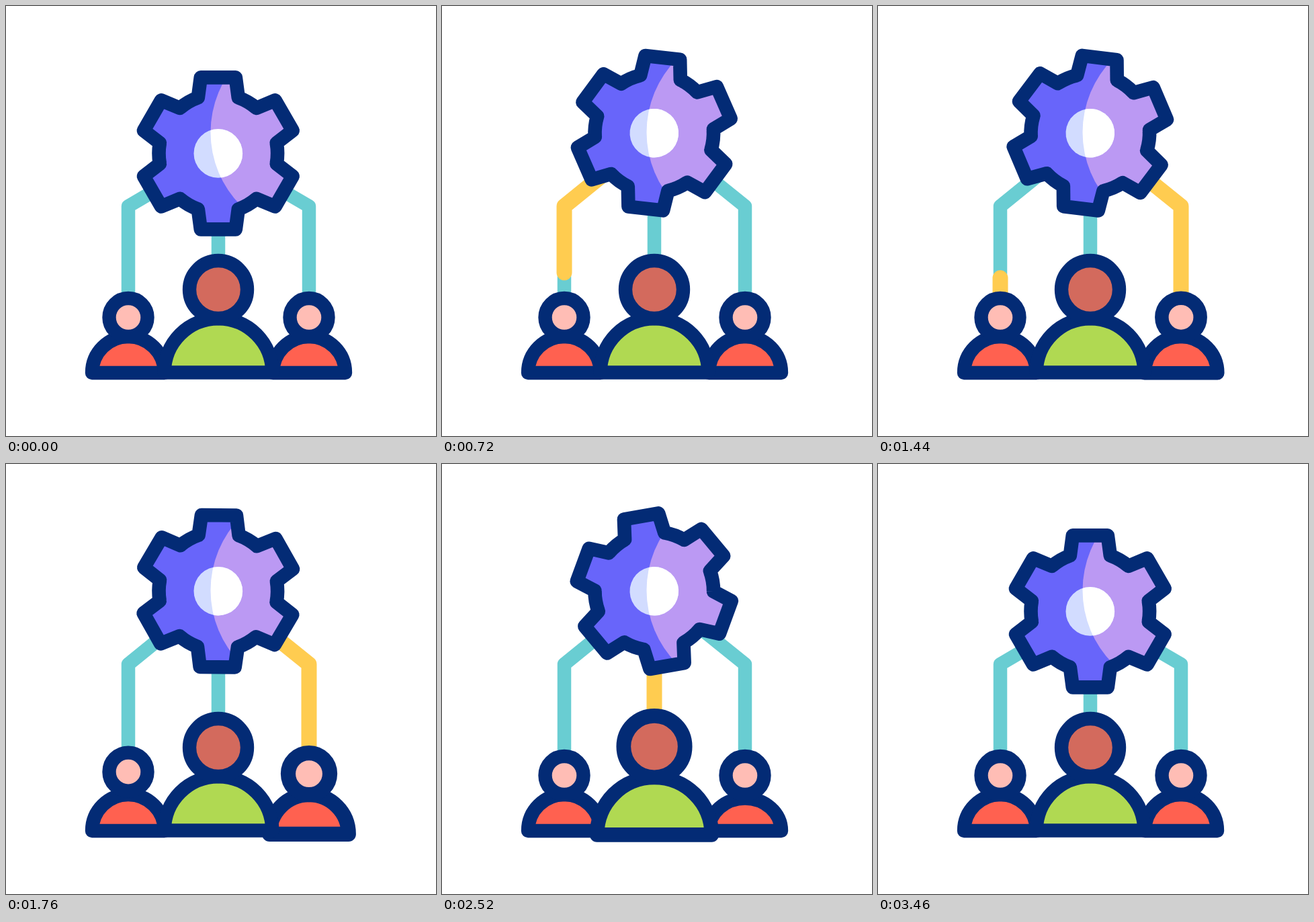
An HTML page with a canvas that plays this animation: 640 by 640 pixels, repeating every 3600 ms.

```html
<!DOCTYPE html>
<html lang="en">
<head>
<meta charset="utf-8">
<title>Team gear</title>
<style>
html, body { margin: 0; height: 100%; overflow: hidden; background: #fff; }
canvas { display: block; width: 640px; height: 640px; }
</style>
</head>
<body>
<canvas id="stage" width="640" height="640"></canvas>
<script>
const ctx = document.getElementById('stage').getContext('2d');
const LOOP = 3600, TAU = Math.PI * 2;
const NAVY = '#032b75', TEAL = '#69cdd2', YELLOW = '#ffcc50';

// baseY, r: body half-disc; midY, amp: pulse centre and size; pulse, hop: times in ms
const people = [
  { x: 182, baseY: 546, r: 54, headY: 463.5, headR: 28.5, midY: 491, amp: .11,
    body: '#ff6150', skin: '#ffbdb5', pulse: 1030, hop: 1620 },
  { x: 451, baseY: 546, r: 54, headY: 463.5, headR: 28.5, midY: 491, amp: .11,
    body: '#ff6150', skin: '#ffbdb5', pulse: 1680, hop: 2100 },
  { x: 316, baseY: 545.5, r: 80.3, headY: 422, headR: 43, midY: 445, amp: .08,
    body: '#b0d952', skin: '#d36a5d', pulse: 2435, hop: 2760 }
];
const rays = [[-180, -65.5], [-199.5, -2.5], [-185.5, 60.5]];

const span = (t, a, b) => Math.min(1, Math.max(0, (t - a) / (b - a)));
const smooth = p => (1 - Math.cos(Math.PI * p)) / 2;
const easeOut = p => Math.sin(p * Math.PI / 2);

const gear = new Path2D();
for (let i = 0; i < 6; i++) {
  const a = i * TAU / 6, c = Math.cos(a), s = Math.sin(a);
  for (const [x, y] of [[-30, -83], [-26, -113], [26, -113], [30, -83]])
    gear.lineTo(x * c - y * s, x * s + y * c);
  gear.arc(0, 0, 88.3, a - TAU / 4 + .347, a - TAU / 4 + .7);
}
gear.closePath();

const hole = new Path2D();
hole.arc(0, 0, 36.3, 0, TAU);

function stroke(points, color, width) {
  ctx.beginPath();
  points.forEach(p => ctx.lineTo(...p));
  ctx.strokeStyle = color;
  ctx.lineWidth = width;
  ctx.stroke();
}

function outlined(fill) {
  ctx.fillStyle = fill;
  ctx.fill();
  ctx.strokeStyle = NAVY;
  ctx.lineWidth = 20.4;
  ctx.stroke();
}

function drawLink(p, cy, t) {
  const points = p.x === 316
    ? [[316, cy], [316, 400]]
    : [[316, cy], [p.x, 298], [p.x, p.headY]];
  stroke(points, TEAL, 20.5);

  let length = 0;
  for (let i = 1; i < points.length; i++)
    length += Math.hypot(points[i][0] - points[i - 1][0], points[i][1] - points[i - 1][1]);
  const from = length * span(t, p.pulse + 130, p.pulse + 470);
  const to = length * span(t, p.pulse - 590, p.pulse - 240);
  if (to <= from) return;
  ctx.setLineDash([to - from, 2000]);
  ctx.lineDashOffset = -from;
  stroke(points, YELLOW, 23);
  ctx.setLineDash([]);
}

function drawPerson(p, t) {
  const d = Math.min(1, Math.abs(t - p.pulse) / 280);
  const scale = 1 + p.amp * Math.cos(d * Math.PI / 2) ** 2;
  const h = (t - p.hop) / 400;
  const lift = 6 * Math.sin(Math.PI * span(h, 0, 1));
  const squash = 6.8 * Math.sin(Math.PI * span(h, .35, 1.45)) ** 2;

  ctx.save();
  ctx.translate(p.x, p.midY);
  ctx.scale(scale, scale);
  ctx.translate(-p.x, -p.midY);
  ctx.beginPath();
  ctx.ellipse(p.x, p.baseY, p.r, p.r - squash, 0, Math.PI, TAU);
  ctx.closePath();
  outlined(p.body);
  ctx.beginPath();
  ctx.arc(p.x, p.headY - lift, p.headR, 0, TAU);
  outlined(p.skin);
  ctx.restore();
}

// The light half is a large fixed circle seen through the moving shape.
function lit(path, dark, light) {
  ctx.save();
  ctx.fillStyle = dark;
  ctx.fill(path);
  ctx.clip(path);
  ctx.resetTransform();
  ctx.beginPath();
  ctx.arc(459.5, 188, 155, 0, TAU);
  ctx.fillStyle = light;
  ctx.fill();
  ctx.restore();
}

function drawGear(cy, t) {
  const turn = (span(t, 683, 1757) + span(t, 1757, 3005)) * Math.PI;
  ctx.save();
  ctx.translate(315.8, cy);
  ctx.rotate(turn);
  lit(gear, '#6865fa', '#bb99f3');
  lit(hole, '#d2dcff', '#fff');
  ctx.strokeStyle = NAVY;
  ctx.lineWidth = 20.6;
  ctx.stroke(gear);
  ctx.restore();
}

function drawRays(t) {
  const to = easeOut(span(t, 2680, 3040));
  const from = span(t, 2780, 3080);
  if (to <= 0 || from >= 1) return;
  for (const [dx, dy] of rays)
    for (const side of [1, -1]) {
      const at = p => {
        const k = side * (.76 + .245 * p);
        return [313.5 + dx * k, 220.5 + dy * k];
      };
      stroke([at(Math.min(from, to)), at(to)], YELLOW, 21);
    }
}

function draw(t) {
  const cy = 219.4 - 30.2 * (smooth(span(t, 260, 660)) - smooth(span(t, 2750, 3150)));
  ctx.fillStyle = '#fff';
  ctx.fillRect(0, 0, 640, 640);
  ctx.lineCap = ctx.lineJoin = 'round';
  people.forEach(p => drawLink(p, cy, t));
  drawRays(t);
  drawGear(cy, t);
  people.forEach(p => drawPerson(p, t));
}

const start = performance.now();
function tick() {
  draw((performance.now() - start) % LOOP);
  requestAnimationFrame(tick);
}
tick();
</script>
</body>
</html>
```
